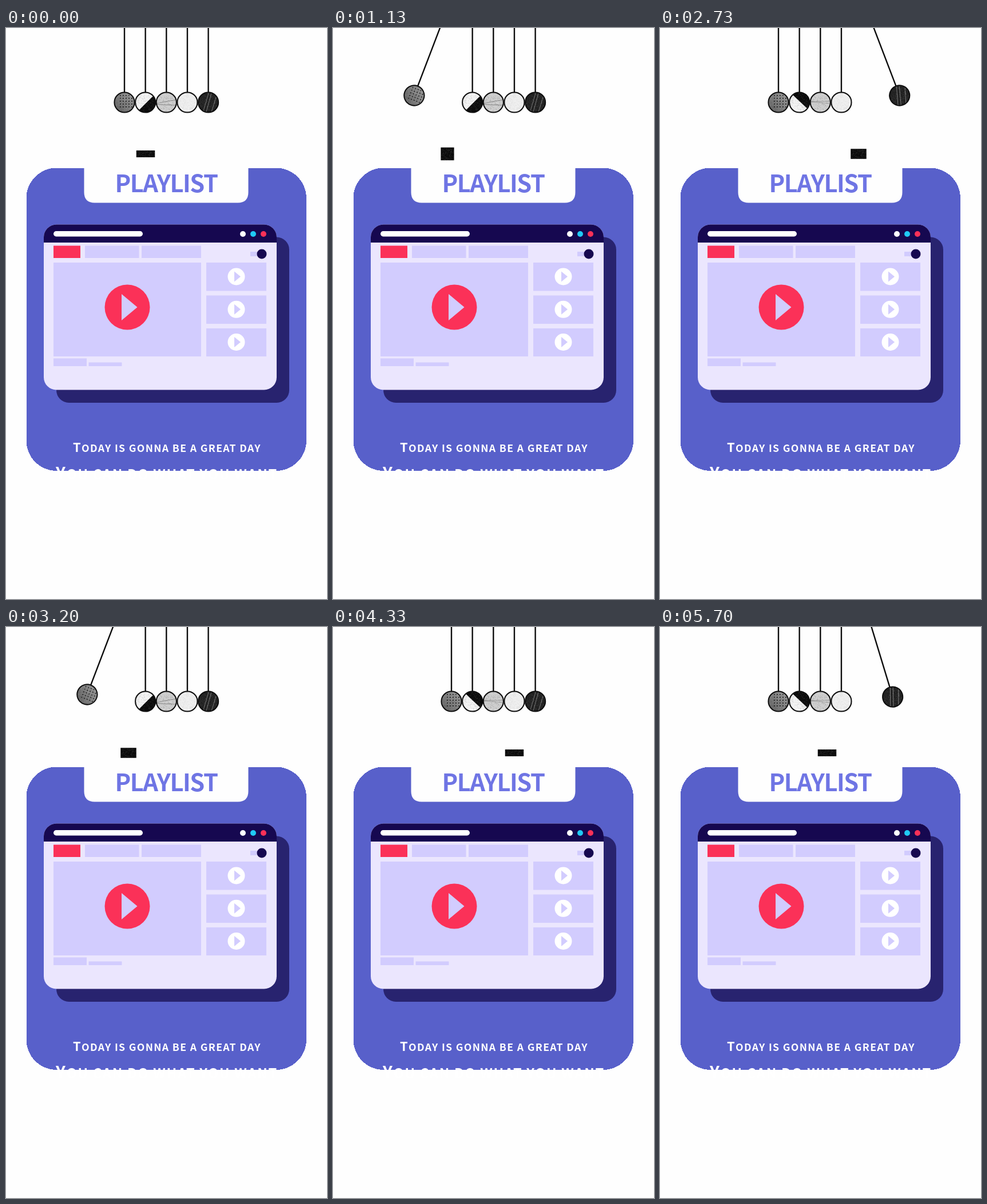
Write an HTML page that moves like this. It is 561 px wide and 998 px high and loops after 5730 ms.

```html
<!DOCTYPE html>
<html lang="en">
<head>
<meta charset="utf-8">
<title>Playlist</title>
<style>
  html, body { margin: 0; width: 100%; height: 100%; overflow: hidden; background: #fefefe; }
  svg { display: block; width: 100vw; height: 100vh; }
  text { font-family: "Noto Sans CJK JP", "Noto Sans CJK SC", sans-serif; text-anchor: middle; }
  .title { font-weight: 700; letter-spacing: -.035em; fill: #6f75e4; }
  .line { font-weight: 700; letter-spacing: .075em; fill: #fff; text-transform: uppercase; }
  .big { font-size: 1.24em; }
  .string { stroke: #0c0c0c; stroke-width: 2.4; }
  .rim { fill: none; stroke: #0c0c0c; stroke-width: 2; }
  .navy { fill: #160850; }
  .red { fill: #fb3158; }
  .lilac { fill: #d2ccfe; }
  .white { fill: #fff; }
</style>
</head>
<body>
<svg viewBox="0 0 561 998" preserveAspectRatio="none">
  <defs>
    <clipPath id="disc"><circle r="18"/></clipPath>
    <clipPath id="window"><rect x="66" y="343.5" width="407" height="289" rx="22"/></clipPath>
    <linearGradient id="grey" x1="0" y1="1" x2="1" y2="0">
      <stop offset="0" stop-color="#5c5c5c"/>
      <stop offset="1" stop-color="#a0a0a0"/>
    </linearGradient>
    <g id="play">
      <circle class="white" r="15"/>
      <path class="lilac" d="M-3.5 -9L7.5 0L-3.5 9Z"/>
    </g>
  </defs>

  <rect x="35.5" y="244.5" width="489.5" height="529.5" rx="53" fill="#5860ca" shape-rendering="crispEdges"/>
  <path d="M136.5 236H423.5V287Q423.5 305.5 405 305.5H155Q136.5 305.5 136.5 287Z" fill="#fefefe"/>
  <text class="title" x="280" data-mid="271.5" data-cap="39" data-width="179">PLAYLIST</text>

  <rect x="88" y="365.5" width="407" height="289.5" rx="22" fill="#28236f"/>
  <g clip-path="url(#window)">
    <rect x="66" y="343" width="407" height="290" fill="#ebe6fe"/>
    <rect class="navy" x="66" y="343" width="407" height="32"/>
  </g>
  <rect class="white" x="83" y="355" width="156" height="9.5" rx="4.7"/>
  <circle class="white" cx="414" cy="360" r="5"/>
  <circle cx="432" cy="360" r="5" fill="#20caf5"/>
  <circle class="red" cx="450" cy="360" r="5"/>
  <rect class="red" x="83" y="380.5" width="47" height="21.5"/>
  <path class="lilac" d="M138 380.5h94.5v21.5H138ZM237 380.5h104v21.5H237ZM427 391h14v8H427Z
    M83 410h258v164H83ZM350 410h105v49.5H350ZM350 467.5h105v49.5H350ZM350 525h105v49H350Z
    M83 577.5h58v13.5H83ZM144.5 584.5h58v6.5h-58Z"/>
  <circle class="navy" cx="447" cy="395" r="8.5"/>
  <circle class="red" cx="212" cy="488" r="39.5"/>
  <path class="lilac" d="M202 465L229.5 488L202 511Z"/>
  <use href="#play" x="402.5" y="434.5"/>
  <use href="#play" x="402.5" y="491.8"/>
  <use href="#play" x="402.5" y="549"/>

  <text class="line" x="281.5" data-mid="735" data-cap="16" data-width="329"><tspan class="big">T</tspan>oday is gonna be a great day</text>
  <text class="line" x="281" data-mid="780.5" data-cap="22" data-width="388"><tspan class="big">Y</tspan>ou can do what you want</text>

  <g id="cradle"></g>
  <g id="block"></g>
</svg>
<script>
  const NS = 'http://www.w3.org/2000/svg';
  const LOOP = 5730, SLOT = 100 / 3, CYCLE = 24, HALF = 12;
  const PIVOT = -52.6, LENGTH = 182.6, CAP = 0.733;
  // Swing angle by distance from the release, and block offset over half a cycle.
  const SWING = [0, 11.7, 16.9, 19.5, 20.9, 21.6, 21.7];
  const SLIDE = [-36.5, -56, -69.5, -76.5, -80.5, -82, -82, -77, -66.5, -48.5, -11.5, 16];

  let seed = 7;
  const rand = () => (seed = seed * 16807 % 2147483647) / 2147483647;

  function add(parent, tag, attrs) {
    const el = document.createElementNS(NS, tag);
    for (const key in attrs) el.setAttribute(key, attrs[key]);
    return parent.appendChild(el);
  }

  function grain(parent, count, size, fill, opacity) {
    let d = '';
    for (let i = 0; i < count; i++) {
      const x = (rand() - 0.5) * (size - 1), y = (rand() - 0.5) * (size - 1);
      d += `M${x.toFixed(1)} ${y.toFixed(1)}h1v1h-1z`;
    }
    add(parent, 'path', { d, fill, opacity });
  }

  const skins = [
    g => {
      let d = '';
      for (let x = -8; x <= 18; x += 5)
        for (let y = -13; y <= 8; y += 5) d += `M${x} ${y}h1.7v1.7h-1.7z`;
      add(g, 'path', { d, fill: '#181818' });
    },
    g => add(g, 'path', { d: 'M14 -11.6A18.2 18.2 0 0 1 -11.7 13.9Z', fill: '#0c0c0c' }),
    g => add(g, 'path', { d: 'M-18 3.5L18 5M-18 2L18 -5', stroke: '#777', 'stroke-width': 0.8 }),
    () => {},
    g => add(g, 'path', {
      d: 'M-9 16L1 -18M-4 18L6 -18M5 18L15 -14', stroke: '#858585', 'stroke-width': 0.9
    })
  ];
  const fills = ['url(#grey)', '#f2f2f2', '#cdcdcd', '#eeeeee', '#222'];

  const cradle = document.getElementById('cradle');
  const arms = fills.map((fill, i) => {
    const x = 207 + i * 36.65;
    const arm = add(cradle, 'g', {});
    add(arm, 'line', { class: 'string', x1: x, x2: x, y1: PIVOT, y2: 112 });
    const ball = add(arm, 'g', { transform: `translate(${x} ${PIVOT + LENGTH})` });
    const face = add(ball, 'g', { 'clip-path': 'url(#disc)' });
    add(face, 'circle', { r: 18, fill });
    const skin = add(face, 'g', {});
    skins[i](skin);
    grain(face, 160, 36, '#000', i === 3 ? 0.08 : 0.18);
    grain(face, 120, 36, '#fff', 0.15);
    add(ball, 'circle', { class: 'rim', r: 17.6 });
    return { arm, skin, x };
  });

  const block = document.getElementById('block');
  add(block, 'rect', { x: -11.5, y: -11.5, width: 23, height: 23, fill: '#0a0a0a' });
  grain(block, 130, 23, '#fff', 0.13);

  // Uniform type size: cap height first, smaller if the line would run too wide.
  for (const el of document.querySelectorAll('text')) {
    const { mid, cap, width } = el.dataset;
    let size = cap / CAP;
    el.style.fontSize = size + 'px';
    size *= Math.min(1, width / el.getComputedTextLength());
    el.style.fontSize = size + 'px';
    el.setAttribute('y', +mid + size * CAP / 2);
  }

  function pose(step) {
    const k = step % CYCLE, h = k % HALF, left = k < HALF;
    const angle = SWING[Math.min(h, HALF - h)];
    const turn = (i, a) => arms[i].arm.setAttribute('transform', `rotate(${a} ${arms[i].x} ${PIVOT})`);
    turn(0, left ? angle : 0);
    turn(4, left ? 0 : -angle);
    arms[1].skin.setAttribute('transform', left ? '' : 'rotate(-92)');
    arms[2].skin.setAttribute('transform', left ? '' : 'scale(1 -.4)');

    const stretch = ((1 + Math.cos((h + 1) * Math.PI / 6)) / 2) ** 1.15;
    const x = 280.5 + (left ? 1 : -1) * SLIDE[h];
    const w = (22.7 + 10.6 * stretch) / 23, tall = (23 - 12 * stretch) / 23;
    block.setAttribute('transform', `translate(${x} 220) scale(${w} ${tall})`);
  }

  // 25 poses a second, shown on a 30 per second clock.
  const start = performance.now();
  function tick(now) {
    const t = Math.max(0, now - start) % LOOP;
    const slot = Math.floor((t + 4) / SLOT);
    pose(Math.floor(slot * 5 / 6));
    requestAnimationFrame(tick);
  }
  pose(0);
  requestAnimationFrame(tick);
</script>
</body>
</html>
```
